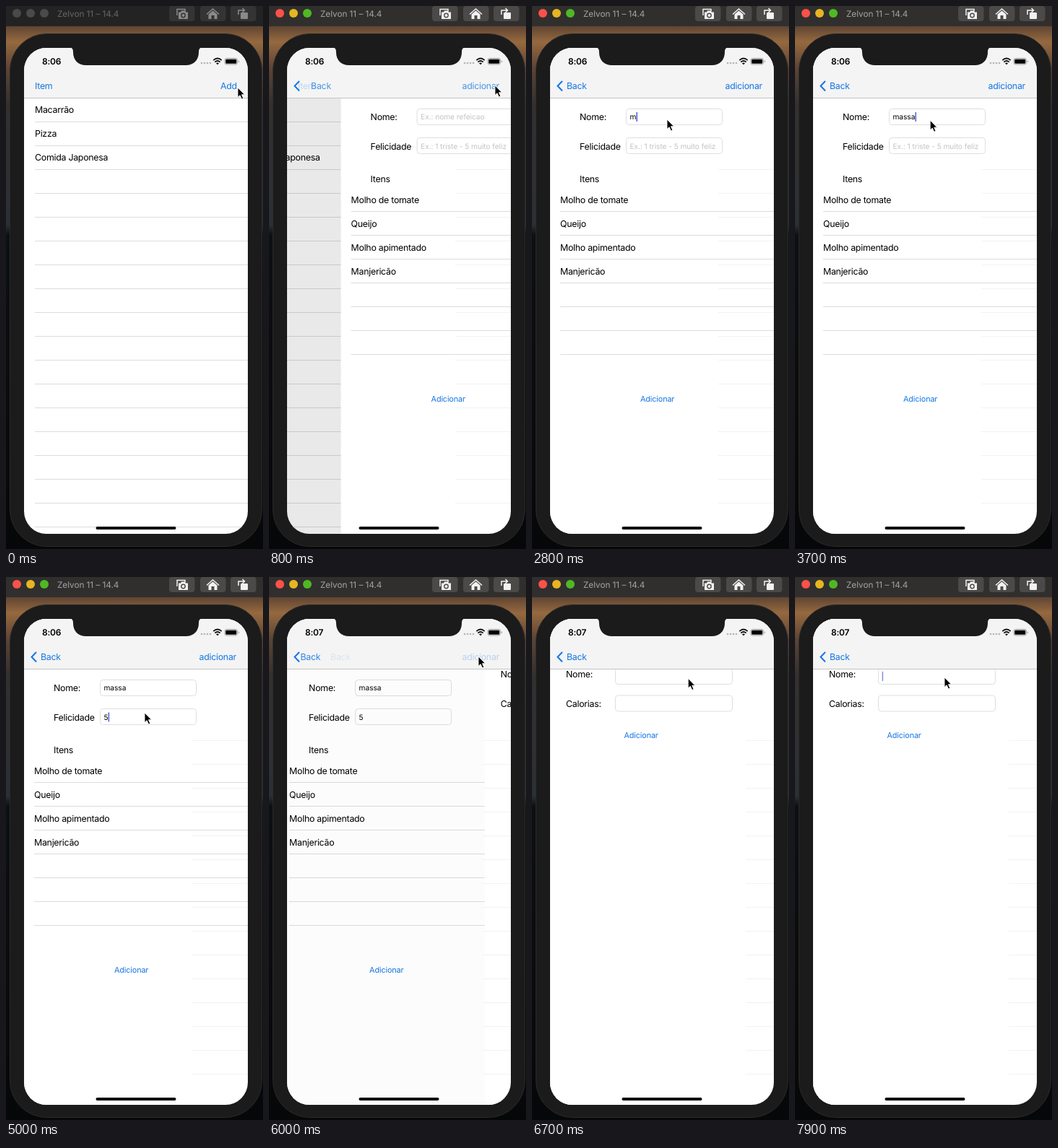
Animation, 356 px wide and 752 px high, one loop 8 s. Source, as an HTML page:

```html
<!DOCTYPE html>
<html lang="pt">
<head>
<meta charset="utf-8">
<title>Simulator</title>
<style>
html, body { margin: 0; width: 100%; height: 100%; overflow: hidden; background: #08090b; }
svg { display: block; width: 100vw; height: 100vh; }
text { font: 12.4px Inter, "Open Sans", sans-serif; letter-spacing: -.28px; text-rendering: geometricPrecision; white-space: pre; }
.blue { fill: #1677e3; }
.small { font-size: 10.2px; letter-spacing: -.06px; }
.hint { fill: #c3c3c6; }
.button { font-size: 10.9px; letter-spacing: -.18px; }
.clock { font-size: 12px; font-weight: 600; letter-spacing: -.2px; }
.caption { font-size: 11.8px; letter-spacing: -.05px; }
.line { stroke: #dcdcde; }
.field { fill: #fff; stroke: #dedee0; }
.caret { fill: #4658cf; }
.icon { fill: none; stroke: var(--ink); stroke-width: 1.5; }
</style>
</head>
<body>
<svg id="stage" viewBox="0 0 356 752" preserveAspectRatio="none"></svg>
<script>
const LOOP = 8000, STEP = 100;
const LEFT = 25, RIGHT = 335, WIDTH = RIGHT - LEFT, NAV_BOTTOM = 127;

const text = (x, y, str, cls = '', id = '') =>
  `<text x="${x}" y="${y}" class="${cls}" id="${id}">${str}</text>`;
const rect = (x, y, w, h, attrs = '') =>
  `<rect x="${x}" y="${y}" width="${w}" height="${h}" ${attrs}/>`;
const lines = (x, first, count) => Array.from({ length: count }, (_, i) =>
  `<path class="line" d="M${x} ${first + 33 * i + .5}H${RIGHT}"/>`).join('');
const rows = (x, first, names) => names.map((n, i) => text(x, first + 33 * i, n)).join('');
const field = (x, y, w) => rect(x + .5, y + .5, w - 1, 22, 'class="field" rx="4"');
const page = (id, body) => `<g id="${id}">${rect(LEFT, 58, WIDTH, 674, 'fill="#fff"')}${body}
  ${rect(LEFT, 58, WIDTH, 674, `id="${id}Dim" opacity="0"`)}</g>`;
const caret = (id, y) => rect(0, y, 1.4, 13, `id="${id}" class="caret"`);

const toolbar = `
  ${rect(0, 0, 356, 28, 'id="bar"')}
  <circle class="light" cx="15" cy="10" r="6"/><circle class="light" cx="34" cy="10" r="6"/>
  <circle class="light" cx="53" cy="10" r="6"/>
  ${text(71, 15, 'Zelvon 11 – 14.4', 'caption', 'caption')}
  <g fill="var(--key)">${[226, 269, 311].map(x => rect(x, 0, 35.5, 21, 'rx="4"')).join('')}</g>
  <path class="icon" d="M237 13V4.500H248V7"/>
  <path fill="var(--ink)" d="M239 8.500H242L243 6.500H248L249 8.500H252V18H239Z"/>
  <circle cx="245.500" cy="13" r="2.700" fill="none" stroke="var(--key)" stroke-width="1.400"/>
  <path class="icon" d="M278 11.500L286.500 4L295 11.500"/>
  <path fill="var(--ink)" d="M280.500 11.500L286.500 6.500L292.500 11.500V18H288.500V13H284.500V18H280.500Z"/>
  ${rect(325, 9, 10, 9, 'rx="1" fill="var(--ink)"')}
  <path class="icon" d="M322 12V6H330M327.500 3L330.500 6L327.500 9"/>`;

const nav = `
  ${rect(LEFT, 58, WIDTH, 69, 'fill="#f4f4f4"')}
  <path d="M25 127.500H335" stroke="#c3c3c5"/>
  <g class="blue">
    ${text(40, 115, 'Item', '', 'itemLabel')}${text(297, 115, 'Add', '', 'addLabel')}
    ${text(48, 115, 'Back', '', 'back1')}${text(267.5, 115, 'adicionar', '', 'saveLabel')}
    ${text(48, 115, 'Back', '', 'back2')}
  </g>
  <path id="chevron" d="M42 104L35.500 110.700L42 117.500" fill="none" stroke="#1677e3" stroke-width="2"/>`;

const status = `
  <path fill="#1b1b1b" d="M88 57C92 58 93 60 93 64C93 75 100 82 111 82H249C260 82 267 75 267 64C267 60 268 58 272 57Z"/>
  ${text(50, 81, '8:06', 'clock', 'clock')}
  <g fill="#b5b5b5">${[271, 275, 279, 283].map(x => `<circle cx="${x}" cy="79" r="1.300"/>`).join('')}</g>
  <g fill="none" stroke="#111" stroke-width="1.700">
    <path d="M287.300 75.200Q293 69.800 298.700 75.200M289.300 77.700Q293 74.300 296.700 77.700"/>
  </g>
  <path d="M291 79.300Q293 77.600 295 79.300L293 81.300Z"/>
  ${rect(303, 72.5, 17.5, 8.5, 'rx="2.500" fill="none" stroke="#888" stroke-width=".800"')}
  ${rect(304.2, 73.7, 15.1, 6.1, 'rx="1.400"')}
  <path d="M322 75.200Q324 76.700 322 78.300Z" fill="#888"/>`;

const listPage = page('list',
  rows(40, 148, ['Macarrão', 'Pizza', 'Comida Japonesa']) + lines(40, 160, 18));

const formPage = page('form', `
  ${text(66, 158, 'Nome:')}${field(130, 142, 134)}
  ${text(135.5, 157, '', 'small', 'name')}${caret('nameCaret', 147)}
  ${text(66, 199, 'Felicidade')}${field(130, 182, 134)}
  ${text(135.5, 198, '', 'small', 'mood')}${caret('moodCaret', 187.5)}
  ${text(66, 244, 'Itens')}
  ${rows(39, 273, ['Molho de tomate', 'Queijo', 'Molho apimentado', 'Manjericão'])}
  ${lines(39, 284, 7)}
  ${text(150, 547.5, 'Adicionar', 'blue button')}`);

const itemPage = page('item', `
  ${text(47, 139, 'Nome:')}${field(115, 126, 163)}
  ${rect(120.7, 131, 1.4, 13, 'id="itemCaret" class="caret"')}
  ${text(47, 180, 'Calorias:')}${field(115, 163.5, 163)}
  ${text(127.5, 223, 'Adicionar', 'blue button')}`);

const stage = document.getElementById('stage');
stage.innerHTML = `
  <defs>
    <clipPath id="screen">${rect(LEFT, 58, WIDTH, 673, 'rx="31"')}</clipPath>
    <clipPath id="fadedArea">${rect(0, 0, 356, 752, 'id="fadedRect"')}</clipPath>
    <linearGradient id="wall" x2="0" y2="1">
      <stop stop-color="#5f4533"/><stop offset=".03" stop-color="#96693f"/>
      <stop offset=".08" stop-color="#5c4435"/><stop offset=".15" stop-color="#33302f"/>
      <stop offset=".38" stop-color="#2b3036"/><stop offset=".4" stop-color="#0d1013"/>
      <stop offset="1" stop-color="#060708"/>
    </linearGradient>
  </defs>
  ${rect(0, 28, 356, 724, 'fill="url(#wall)"')}
  ${toolbar}
  ${rect(5.5, 38.5, 349, 710, 'rx="51" fill="#1b1b1b" stroke="#2b2a29"')}
  <g clip-path="url(#screen)">
    ${listPage}${formPage}${itemPage}
    <g id="faded" opacity=".35" clip-path="url(#fadedArea)">${lines(258, 226, 15)}</g>
    ${nav}${status}
    ${rect(124.5, 721, 111, 4, 'rx="2"')}
  </g>
  <path id="pointer" d="M0 0V13.500L3.100 10.700L5.500 16L7.800 15L5.500 9.800H9.600Z" stroke="#fff" stroke-width=".900"/>`;

const el = Object.fromEntries([...stage.querySelectorAll('[id]')].map(n => [n.id, n]));
const lights = stage.querySelectorAll('.light');
const move = (node, x, y = 0) => node.setAttribute('transform', `translate(${x} ${y})`);
const alpha = (node, a) => node.setAttribute('opacity', Math.max(0, Math.min(1, a)));

// Time, x, y
const pointerPath = [
  [0, 321, 113], [200, 313, 110], [800, 313, 110], [1300, 186.5, 154],
  [1700, 186.5, 154], [2000, 187, 157], [3600, 187, 157], [4400, 192, 188],
  [5100, 192, 188], [5900, 290, 110], [6200, 290, 110], [6900, 198, 148],
  [7200, 207, 139], [LOOP, 207, 139]
];
function pointerAt(t) {
  const i = pointerPath.findIndex(p => p[0] > t);
  const [t0, x0, y0] = pointerPath[i - 1], [t1, x1, y1] = pointerPath[i];
  const u = (t - t0) / (t1 - t0), k = u * u * (3 - 2 * u);
  return [x0 + (x1 - x0) * k, y0 + (y1 - y0) * k];
}

// Critically damped spring: progress of a page push
function push(t, start) {
  const q = Math.max(0, t - start) * .0183;
  const rest = (1 + q) * Math.exp(-q);
  return rest < .004 ? 1 : 1 - rest;
}

function input(label, marker, value, hint, focused) {
  label.textContent = value || hint;
  label.setAttribute('class', value ? 'small' : 'small hint');
  marker.setAttribute('x', 135.7 + (value ? label.getComputedTextLength() : 0));
  alpha(marker, focused ? 1 : 0);
}

const keyTimes = [2800, 2900, 3200, 3300, 3400];

function draw(t) {
  const active = t >= 400;
  stage.style.setProperty('--key', active ? '#4b4a49' : '#343434');
  stage.style.setProperty('--ink', active ? '#f2f2f2' : '#8a8a8a');
  el.bar.setAttribute('fill', active ? '#302f2e' : '#232323');
  el.caption.setAttribute('fill', active ? '#a3a3a3' : '#666');
  ['#fb5149', '#e6b522', '#4fb924'].forEach((c, i) => lights[i].setAttribute('fill', active ? c : '#4a4a4a'));

  const p1 = push(t, 650), p2 = push(t, 5968);
  move(el.list, -93 * p1);
  move(el.form, WIDTH * (1 - p1) - 93 * p2);
  move(el.item, WIDTH * (1 - p2));
  alpha(el.listDim, .115 * p1);
  alpha(el.formDim, .115 * p2);

  alpha(el.itemLabel, 1 - p1);
  alpha(el.addLabel, t >= 600 ? .3 * (1 - 2 * p1) : 1);
  alpha(el.chevron, p1 * 1.3);
  move(el.back1, 42 * (1 - p1) - 38 * p2);
  alpha(el.back1, p1 * (1 - p2));
  move(el.back2, 42 * (1 - p2));
  alpha(el.back2, p2);
  alpha(el.saveLabel, p1 * (t >= 5900 ? .3 * (1 - p2) : 1));

  const typed = keyTimes.filter(k => k <= t).length;
  input(el.name, el.nameCaret, 'massa'.slice(0, typed), 'Ex.: nome refeicao', t >= 1900 && t < 4700);
  input(el.mood, el.moodCaret, t >= 5000 ? '5' : '', 'Ex.: 1 triste - 5 muito feliz', t >= 4700 && t < 5900);
  alpha(el.itemCaret, t < 7400 ? 0 : t < 7900 ? 1 : .7);

  alpha(el.faded, t >= 800 ? .35 : 0);
  el.fadedRect.setAttribute('x', t >= 6000 ? 296 : 258);
  el.clock.textContent = t >= 5500 ? '8:07' : '8:06';
  move(el.pointer, ...pointerAt(t));
}

function tick() {
  draw(Math.floor(performance.now() % LOOP / STEP) * STEP);
  requestAnimationFrame(tick);
}
tick();
</script>
</body>
</html>
```
